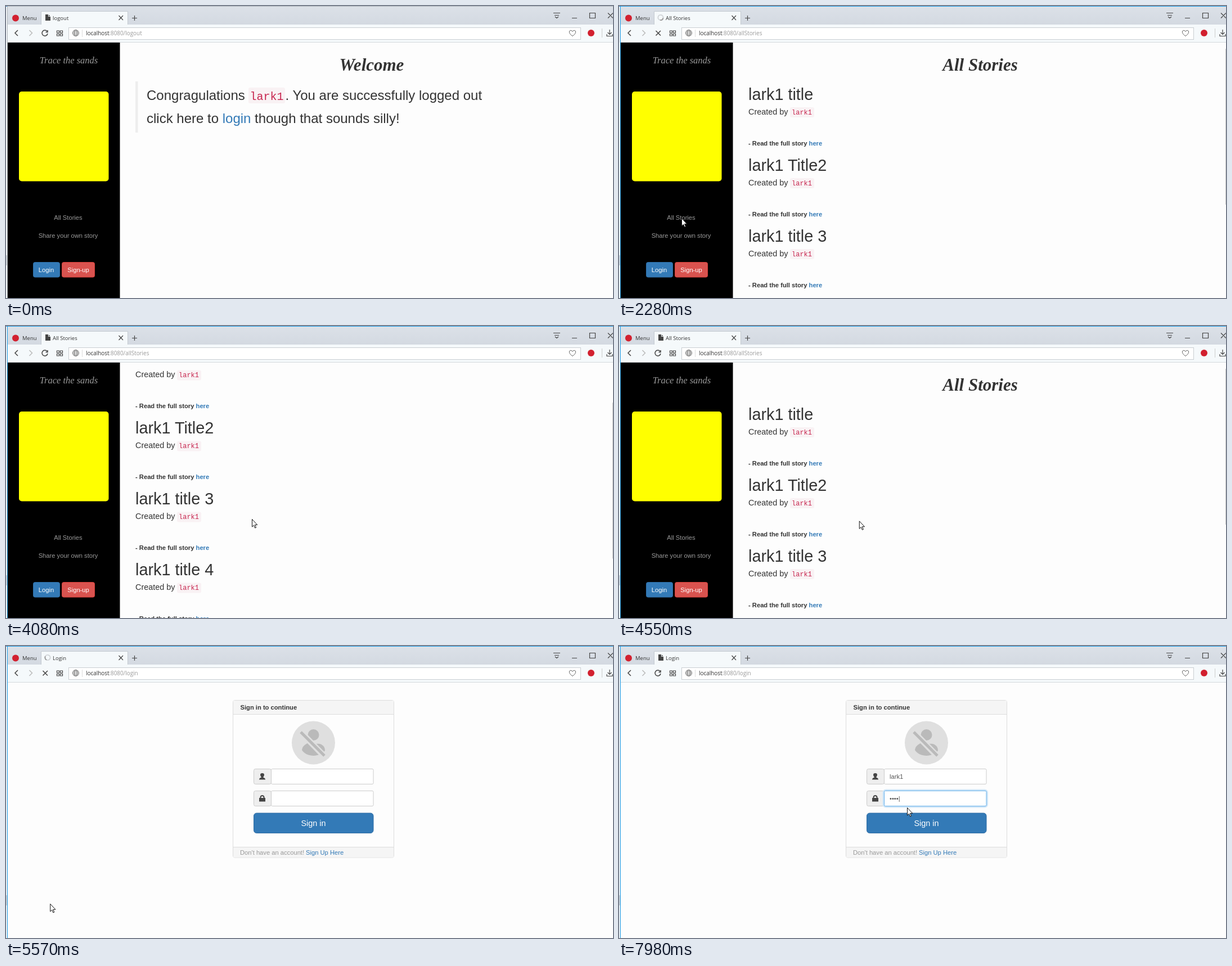
These frames come from a looping animation (1079x519 px, 8 s). An HTML page:

```html
<!DOCTYPE html>
<html lang="en">
<head>
<meta charset="utf-8">
<title>Story site walkthrough</title>
<style>
html, body { margin: 0; width: 100%; height: 100%; overflow: hidden; background: #fdfdfd; }
svg { display: block; width: 1079px; height: 519px; }
text { font-family: "Liberation Sans", Arial, sans-serif; font-size: 11.2px; fill: #333; }
.ui { font-family: "Open Sans", "Noto Sans", sans-serif; font-size: 9.5px; fill: #333; }
.url { font-size: 9.9px; }
.script { font-family: "Liberation Serif", serif; font-style: italic; font-weight: bold; font-size: 31px; text-anchor: middle; }
.code { font-family: "Liberation Mono", monospace; font-size: 12px; fill: #c7254e; }
.big { font-size: 24px; }
.title { font-size: 28.8px; }
.sub { font-size: 14.4px; }
.bold { font-weight: bold; }
.link { fill: #337ab7; }
.side { fill: #999; text-anchor: middle; }
.white { fill: #fff; text-anchor: middle; }
.option { font-size: 9.6px; font-weight: bold; fill: #111; }
.icon { fill: none; stroke: #444; stroke-width: 1.2; }
</style>
</head>
<body>
<svg id="stage" viewBox="0 0 1079 519"></svg>
<script>
const LOOP = 8000;
const MAX_SCROLL = 265;
const TRACK_RATIO = 0.594;

const rect = (x, y, w, h, fill, extra = "") =>
  `<rect x="${x}" y="${y}" width="${w}" height="${h}" fill="${fill}" ${extra}/>`;
const text = (x, y, words, cls = "", extra = "") =>
  `<text x="${x}" y="${y}" class="${cls}" ${extra}>${words}</text>`;
const icon = (d, extra = "") => `<path class="icon" d="${d}" ${extra}/>`;
const group = (id, content, extra = "") => `<g id="${id}" ${extra}>${content}</g>`;

function browserChrome() {
  return `
    <defs><linearGradient id="strip" x2="0" y2="1">
      <stop stop-color="#dce1e8"/><stop offset="1" stop-color="#d3d9e1"/></linearGradient></defs>
    ${rect(0, 0, 1079, 34, "url(#strip)")}
    ${rect(3, 33, 1076, 31, "#f5f9fb")}
    ${rect(3, 64, 1076, 1, "#d3d8dc")}
    <path d="M62.5 33V9.500H216.500V33" fill="#f5f9fb" stroke="#c3c9d0"/>
    <circle cx="17" cy="21.500" r="6" fill="#d2202f"/>
    ${text(29, 25, "Menu", "ui")}
    ${text(83, 25, "", "ui", 'id="tabName"')}
    ${group("pageIcon", '<path d="M70 15H75.500L79 18.500V26H70Z" fill="#444"/><path d="M75.500 15V18.500H79" fill="none" stroke="#f5f9fb"/>')}
    ${group("spinner", '<circle cx="74" cy="20.500" r="4.600" fill="none" stroke="#d3d6d9" stroke-width="2"/><path d="M74 15.900A4.600 4.600 0 0 1 78.600 20.500" fill="none" stroke="#999" stroke-width="2"/>')}
    ${icon("M200.500 17L208 25M208 17L200.500 25M224 21.500H233M228.500 17V26")}
    ${icon("M973 12.500H985M975 16.500H983M976 19L979 21.500L982 19M1006 21.500H1015M1037.500 12.500H1047.500V21.500H1037.500ZM1070 12.500L1079 21.500M1079 12.500L1070 21.500")}
    ${icon("M21 43L16 48L21 53", 'style="stroke-width:1.500"')}
    ${icon("M41.500 43L46.500 48L41.500 53", 'style="stroke:#bbb;stroke-width:1.500"')}
    ${group("reload", icon("M73 45A5 5 0 1 0 74 49M74 43V46.500H70.500", 'style="stroke-width:1.500"'))}
    ${group("stop", icon("M65.500 44L74 52.500M74 44L65.500 52.500", 'style="stroke-width:1.500"'))}
    ${icon("M90.500 44H94.500V47.500H90.500ZM96.500 44H100.500V47.500H96.500ZM90.500 49.500H94.500V53H90.500ZM96.500 49.500H100.500V53H96.500Z")}
    ${rect(111.5, 38.5, 910, 21, "#fff", 'stroke="#c9ced2"')}
    <g fill="none" stroke="#777"><circle cx="124" cy="48" r="5.500"/><ellipse cx="124" cy="48" rx="2.500" ry="5.500"/><path d="M118.500 48H129.500M119.500 45H128.500M119.500 51H128.500"/></g>
    ${rect(135, 42, 1, 13, "#ddd")}
    <text x="142" y="52" class="ui url">localhost<tspan fill="#999">:8080/<tspan id="path"></tspan></tspan></text>
    ${icon("M1007 53.500C996 46 1004 40 1007 45.500C1010 40 1018 46 1007 53.500Z", 'style="stroke:#666;stroke-width:1"')}
    <circle cx="1040" cy="48" r="6" fill="#d2202f"/>
    ${rect(1059, 40, 1, 16, "#ccc")}
    ${icon("M1073 42V50M1069.500 47L1073 50.500L1076.500 47M1068 50V53.500H1078V50")}`;
}

function sidebar() {
  return rect(3, 65, 199.5, 454, "#000") +
    text(111.5, 102, "Trace the sands", "script side", 'style="font-size:16.500px;font-weight:normal"') +
    rect(23, 152, 159.5, 159.5, "#ff0", 'rx="5"') +
    text(110.5, 380, "All Stories", "side") +
    text(110.5, 411.5, "Share your own story", "side") +
    rect(48.5, 455.5, 47, 26.5, "#337ab7", 'id="loginButton" stroke="#2e6da4" rx="3"') +
    rect(99.5, 455.5, 58, 26.5, "#d9534f", 'stroke="#d43f3a" rx="3"') +
    text(71.5, 472.5, "Login", "white") + text(128.5, 472.5, "Sign-up", "white");
}

function logoutPage() {
  return text(650, 115, "Welcome", "script") +
    rect(230, 134, 4.5, 91, "#eee") +
    text(250, 167, "Congragulations", "big") +
    rect(431, 145, 65, 28, "#f9f2f4", 'rx="3"') +
    text(433.5, 167, "lark1", "code", 'style="font-size:20px"') +
    text(496.5, 167, ". You are successfully logged out", "big") +
    text(250, 208, 'click here to <tspan class="link">login</tspan> though that sounds silly!', "big");
}

function storyList() {
  const names = ["title", "Title2", "title 3", "title 4", "title 5"];
  return text(642, 115, "All Stories", "script") + names.map((name, i) => {
    const y = 126 * i;
    return text(230, 167 + y, "lark1 " + name, "title") +
      text(230, 193 + y, "Created by", "sub") +
      rect(304, 180 + y, 43, 18, "#f9f2f4", 'rx="3"') +
      text(307, 193 + y, "lark1", "code") +
      text(230, 248 + y, '- Read the full story <tspan class="link">here</tspan>', "bold");
  }).join("");
}

function field(id, y, symbol) {
  return rect(440.5, y, 31, 27, "#eee", 'stroke="#ccc" rx="3"') +
    `<path d="${symbol}" fill="#444"/>` +
    rect(470.5, y - 1, 183.5, 29, "none", `id="${id}Glow" stroke="#cfe6f8" stroke-width="4" rx="4"`) +
    rect(471.5, y, 181.5, 27, "#fff", `id="${id}Box" rx="2"`) +
    text(481, y + 17.5, "", "", `id="${id}Text" style="fill:#555"`);
}

function loginPage() {
  const options = ["lark", "lark1", "larkUser", "lark6"];
  return rect(403.5, 96.5, 286, 279.5, "#fdfdfd", 'stroke="#ddd" rx="3"') +
    rect(404, 97, 285, 24.5, "#f5f5f5") + rect(404, 121, 285, 1, "#ddd") +
    text(416.5, 113, "Sign in to continue", "bold") +
    '<circle cx="546.500" cy="172" r="38.500" fill="#dfdfdf"/>' +
    '<g fill="#bababa"><ellipse cx="546.500" cy="158" rx="10" ry="10"/><path d="M526 185C527 176 535 173 541 171C548 177 556 171 562 176Q567 179 567 186C558 198 534 198 526 185Z"/></g>' +
    '<path d="M523 152L566 196" stroke="#dfdfdf" stroke-width="11"/><path d="M524 153L566 195" stroke="#bababa" stroke-width="5"/>' +
    field("user", 218.5, "M450 237.500Q450 234.500 454 233.500Q452 231 452 229Q452 226 455.500 226Q459 226 459 229Q459 231 457 233.500Q461 234.500 461 237.500Z") +
    field("pass", 257.5, "M450 270H451.500V268.500Q452 265 455.500 265Q459 265 459.500 268.500V270H461V276.500H450ZM453.500 270H457.500V268.500Q457 267 455.500 267Q454 267 453.500 268.500Z") +
    rect(440.5, 297, 212.5, 35.5, "#337ab7", 'stroke="#2e6da4" rx="5"') +
    text(546.5, 319.5, "Sign in", "sub white") +
    rect(404, 357.5, 285, 18, "#f5f5f5") + rect(404, 357, 285, 1, "#ddd") +
    text(416, 371, "Don't have an account!", "", 'style="fill:#999"') +
    text(533, 371, "Sign Up Here", "link") +
    group("options", rect(470.5, 246.5, 184, 77, "#fff", 'id="optionBox" stroke="#bbb"') +
      options.map((name, i) => text(477.5, 259.5 + 19.1 * i, name, "option")).join(""));
}

const cursorShapes = {
  arrow: '<path d="M.5 .5V14L3.500 11.200L5.600 16L7.600 15.200L5.500 10.400H9.700Z" fill="#fff" stroke="#111"/>',
  hand: '<path d="M-1.500 9V1Q0-1 1.500 1V6L6.500 7Q8 7.500 8 9V12L6 17H-2L-6 11Q-6 8.500-4 9.500L-1.500 11.500Z" fill="#fff" stroke="#111"/><path d="M3 7V10M5.500 7.500V10" stroke="#111" stroke-width=".8"/>',
  beam: '<path d="M-3-6H-1Q0-6 0-5Q0-6 1-6H3M0-5V5M-3 6H-1Q0 6 0 5Q0 6 1 6H3" fill="none" stroke="#222" stroke-width="1.300"/>'
};

document.getElementById("stage").innerHTML =
  rect(0, 0, 1079, 519, "#fdfdfd") +
  group("logoutView", logoutPage()) +
  group("storiesView", group("storyScroll", storyList()) + rect(1078, 76, 1, 277, "#c4c4c4", 'id="thumb"')) +
  group("loginView", loginPage()) +
  group("sidebar", sidebar()) +
  browserChrome() +
  rect(0, 0, 2, 519, "#edf0f3") + rect(0, 443, 2, 18, "#c9ced4") + rect(0, 0, 70, 1, "#2f7fc4") +
  `<path id="frame" d="M2.500 519V.5H1079" fill="none"/>` +
  group("cursor", Object.entries(cursorShapes).map(([id, shape]) => group(id, shape)).join(""));

const el = Object.fromEntries([...document.querySelectorAll("[id]")].map(node => [node.id, node]));
const show = (id, visible) => el[id].setAttribute("display", visible ? "inline" : "none");
const set = (id, name, value) => el[id].setAttribute(name, value);
const write = (id, value) => { if (el[id].textContent !== value) el[id].textContent = value; };
const during = (t, from, to) => t >= from && t < to;
const progress = (t, from, to) => Math.min(1, Math.max(0, (t - from) / (to - from)));
const easeOut = u => 1 - (1 - u) ** 2;
const smooth = u => u * u * (3 - 2 * u);

// Pointer stops: time, x, y
const pointer = [
  [110, 786, 358], [810, 107, 437], [880, 108, 430], [970, 109, 425], [1030, 110, 405],
  [1510, 110, 405], [1670, 111, 374], [1990, 111, 377], [2300, 111, 377], [2600, 437, 343],
  [4490, 437, 343], [5100, 72, 461], [5540, 72, 461], [5980, 510, 244], [6730, 510, 244],
  [6960, 513, 216], [7300, 513, 262], [7520, 512, 276], [7910, 512, 276], [7980, 512, 287]
];

function pointerAt(t) {
  const next = pointer.findIndex(stop => stop[0] > t);
  if (next < 0) return pointer.at(-1).slice(1);
  if (next === 0) return pointer[0].slice(1);
  const [t0, x0, y0] = pointer[next - 1], [t1, x1, y1] = pointer[next];
  const u = smooth(progress(t, t0, t1));
  return [x0 + (x1 - x0) * u, y0 + (y1 - y0) * u];
}

const typed = (t, word, times) => word.slice(0, times.filter(time => t >= time).length);

function drawField(id, value, focused) {
  write(id + "Text", value + (focused ? "|" : ""));
  set(id + "Box", "stroke", focused ? "#66afe9" : "#ccc");
  show(id + "Glow", focused);
}

function render(t) {
  const page = t < 2210 ? "logout" : t < 5560 ? "stories" : "login";
  for (const name of ["logout", "stories", "login"]) show(name + "View", name === page);
  show("sidebar", page !== "login");
  write("tabName", { logout: "logout", stories: "All Stories", login: "Login" }[page]);
  write("path", page === "stories" ? "allStories" : page);
  set("frame", "stroke", t < 1990 ? "#aeb4bb" : "#1a9be6");

  const loading = during(t, 2060, 2560) || during(t, 5400, 5800);
  show("spinner", loading);
  show("stop", loading);
  show("pageIcon", !loading);
  show("reload", !loading);
  set("spinner", "transform", `rotate(${t * 0.36 % 360} 74 20.5)`);

  const scroll = MAX_SCROLL * (easeOut(progress(t, 2830, 3470)) - easeOut(progress(t, 3940, 4310)));
  set("storyScroll", "transform", `translate(0 ${-scroll})`);
  set("thumb", "y", 76 + scroll * TRACK_RATIO);
  set("loginButton", "fill", during(t, 5030, 5560) ? "#286090" : "#337ab7");

  const userFocused = during(t, 5900, 7590);
  drawField("user", typed(t, "lark1", [6120, 6350, 6430, 6510, 6730]), userFocused);
  drawField("pass", typed(t, "••••", [7670, 7750, 7910, 7980]), t >= 7590);
  show("options", during(t, 6120, 6890));

  const [x, y] = pointerAt(t);
  const kind = during(t, 1010, 2210) || during(t, 5030, 5560) ? "hand" : during(t, 5930, 7950) ? "beam" : "arrow";
  for (const name in cursorShapes) show(name, name === kind);
  show("cursor", t >= 110);
  set("cursor", "transform", `translate(${x} ${y})`);
}

function tick() {
  render(performance.now() % LOOP);
  requestAnimationFrame(tick);
}
tick();
</script>
</body>
</html>
```
